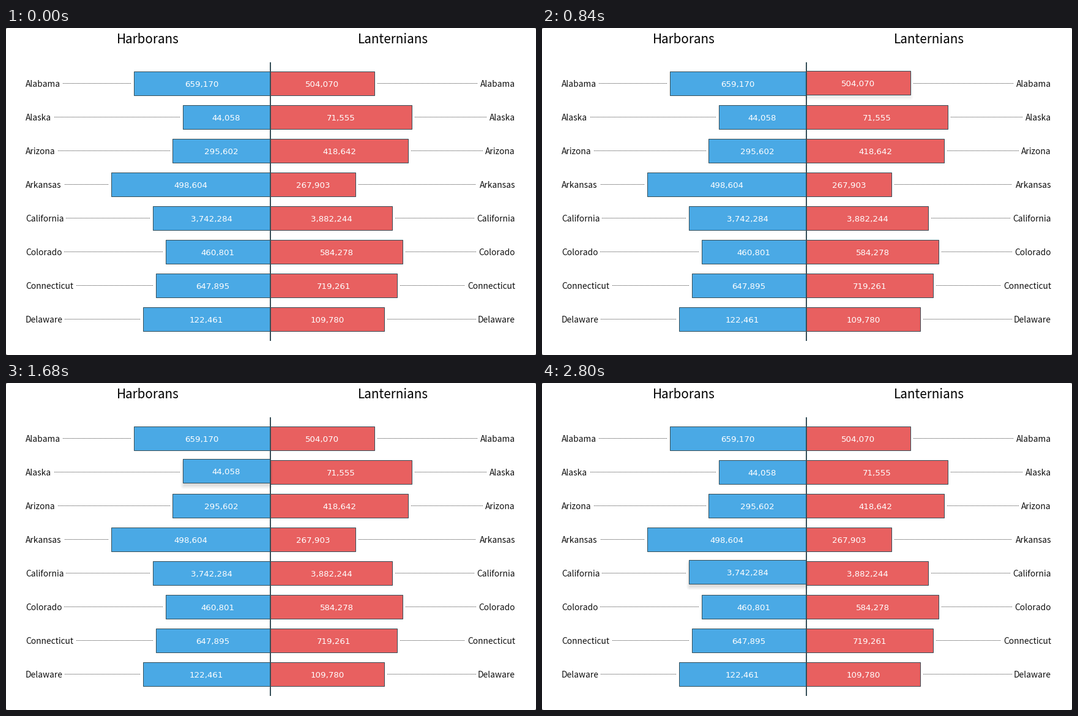
A matplotlib script that plays this animation: 866x534 px, repeating every 2870 ms.

```python
import matplotlib.pyplot as plt
from matplotlib.animation import FuncAnimation
from matplotlib.patches import FancyBboxPatch, Rectangle

W, H, DPI = 866, 534, 64
PX = 72 / DPI
FRAMES, STEP = 41, 70
MID, TOP, ROW, BAR_H = 432, 71, 55, 40
BLUE, RED, LINE = "#4aa9e5", "#e86060", "#37505a"
LIFT, RAMP = 2, 140

# state, outer edge and votes of the left bar, then of the right bar
ROWS = [
    ("Alabama", 209, 659170, 603, 504070),
    ("Alaska", 289, 44058, 664, 71555),
    ("Arizona", 272, 295602, 658, 418642),
    ("Arkansas", 172, 498604, 572, 267903),
    ("California", 240, 3742284, 632, 3882244),
    ("Colorado", 261, 460801, 649, 584278),
    ("Connecticut", 245, 647895, 640, 719261),
    ("Delaware", 224, 122461, 619, 109780),
]
LEADERS = [93, 79, 85, 96, 98, 95, 115, 96]

# (side, row): time the pointer enters and leaves, in ms
HOVERS = {
    ("right", 0): (770, 940),
    ("right", 1): (940, 1340),
    ("left", 1): (1340, 1960),
    ("left", 2): (1960, 2200),
    ("left", 3): (2200, 2560),
    ("left", 4): (2560, 3100),
}

fig = plt.figure(figsize=(W / DPI, H / DPI), dpi=DPI, facecolor="#8c8c8c")
ax = fig.add_axes([0, 0, 1, 1])
ax.set_xlim(0, W)
ax.set_ylim(H, 0)
ax.axis("off")


def text(x, y, s, size, color="#111111", ha="center", font="Noto Sans CJK JP"):
    return ax.text(x, y, s, fontsize=size * PX, color=color, ha=ha,
                   va="baseline", family=font, zorder=4)


def rounded(x, y, w, h, r, **style):
    box = FancyBboxPatch((x, y), w, h, lw=0,
                         boxstyle=f"round,pad=0,rounding_size={r}", **style)
    return ax.add_patch(box)


def smooth(t):
    t = min(max(t, 0), 1)
    return t * t * (3 - 2 * t)


class Bar:
    def __init__(self, x0, x1, row, color, votes):
        self.y = TOP + row * ROW
        self.shadow = [
            rounded(x0 - g, self.y + 3 - g, x1 - x0 + 2 * g, BAR_H + 2 * g,
                    g + 2, fc="black", alpha=0, zorder=5)
            for g in range(-2, 5)
        ]
        # snapping would push half-pixel edges one pixel over
        self.rect = ax.add_patch(Rectangle(
            (x0 + 0.5, self.y + 0.5), x1 - x0 - 1, BAR_H - 1,
            fc=color, ec=LINE, lw=PX, snap=False))
        self.label = text((x0 + x1) / 2 - 0.5, self.y + 25, f"{votes:,}",
                          13.4, "white", font="DejaVu Sans")

    def raise_by(self, k):
        dy = LIFT * k
        self.rect.set_y(self.y + 0.5 - dy)
        self.label.set_y(self.y + 25 - dy)
        self.rect.set_zorder(6 if k else 2)
        self.label.set_zorder(7 if k else 4)
        for layer in self.shadow:
            layer.set_alpha(0.02 * k)


rounded(0, 0, W, H, 3, fc="white", zorder=0)
text(231.5, 25, "Harborans", 20.6, "black")
text(632, 25, "Lanternians", 20.6, "black")
ax.plot([MID, MID], [56, 511], color=LINE, lw=2 * PX, zorder=3,
        solid_capstyle="butt")

bars = {}
for i, (state, left, votes_l, right, votes_r) in enumerate(ROWS):
    y = TOP + i * ROW
    text(32, y + 25, state, 13.8, ha="left")
    text(832, y + 25, state, 13.8, ha="right")
    for a, b in ((LEADERS[i], left - 4), (right + 4, 2 * MID - LEADERS[i])):
        ax.plot([a, b], [y + 19.5] * 2, color="#444444", lw=PX,
                ls=(0, (1, 1)), zorder=1, snap=False)
    bars["left", i] = Bar(left, MID, i, BLUE, votes_l)
    bars["right", i] = Bar(MID, right, i, RED, votes_r)


def draw(frame):
    t = frame * STEP
    for key, bar in bars.items():
        start, end = HOVERS.get(key, (1e6, 1e6))
        bar.raise_by(smooth((t - start) / RAMP) - smooth((t - end) / RAMP))
    return []


anim = FuncAnimation(fig, draw, frames=FRAMES, interval=STEP, repeat=True,
                     repeat_delay=0, blit=False)
plt.show()
```
